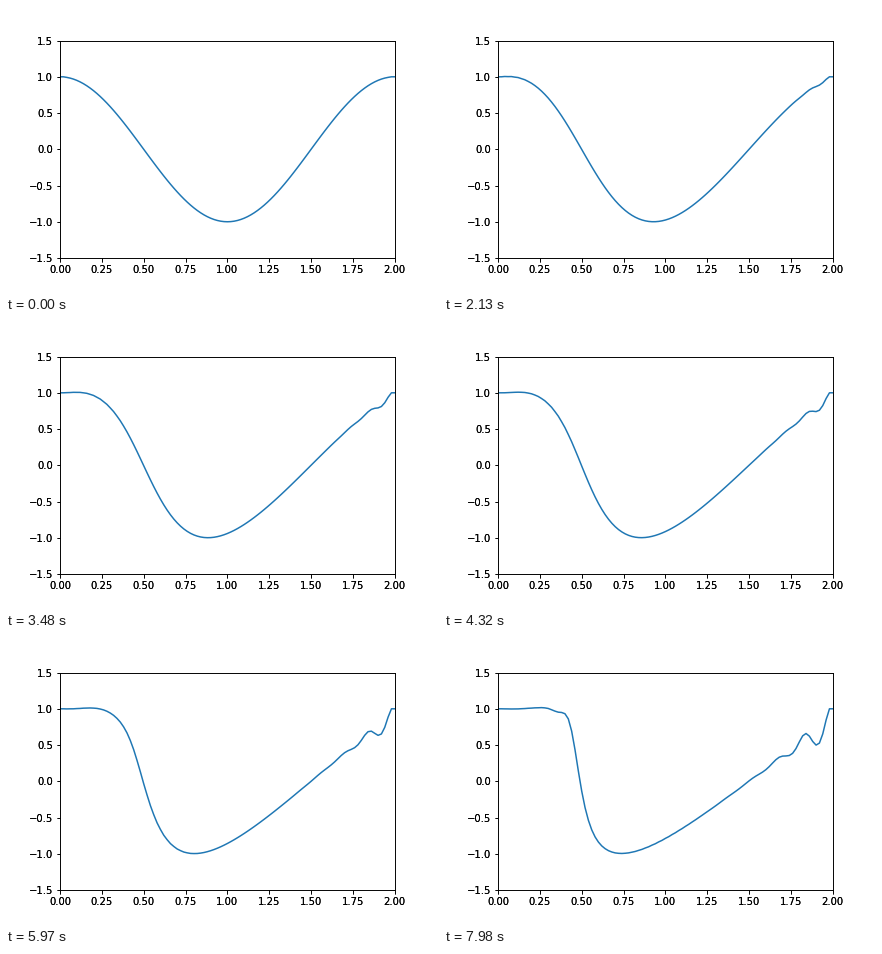
A matplotlib script for the animation above (8000 ms loop, 432 by 288 pixels).

```python
import numpy as np
import matplotlib.pyplot as plt
from matplotlib.animation import FuncAnimation

LOOP, INTERVAL, STEP = 8000, 20, 30   # ms
DELTA, DT, N = 0.022, 0.001, 101      # dispersion, time step, grid points

x = np.linspace(0, 2, N)
dx = x[1] - x[0]


def slope(u):
    """Zabusky-Kruskal form of du/dt = -u u_x - delta^2 u_xxx; the ends stay fixed."""
    du = np.zeros(N)
    advect = (u[3:-1] + u[2:-2] + u[1:-3]) * (u[3:-1] - u[1:-3]) / (6 * dx)
    disperse = (u[4:] - 2 * u[3:-1] + 2 * u[1:-3] - u[:-4]) / (2 * dx**3)
    du[2:-2] = -advect - DELTA**2 * disperse
    return du


def solve(count):
    u = np.cos(np.pi * x)
    u[:2] = u[-2:] = 1
    states = [u, u + DT * slope(u)]
    while len(states) < count:
        states.append(states[-2] + 2 * DT * slope(states[-1]))
    return states


waves = solve(LOOP // STEP + 1)

fig = plt.figure(figsize=(6, 4), dpi=72, facecolor="white")
area = [0.125, 0.125, 0.775, 0.755]


def add_axes(label):
    ax = fig.add_axes(area, label=label, facecolor="none")
    ax.set(xlim=(0, 2), ylim=(-1.5, 1.5),
           xticks=np.arange(0, 2.1, 0.25), yticks=np.arange(-1.5, 1.6, 0.5))
    return ax


# A second axes on top gives the dense, dark tick labels.
ax = add_axes("wave")
add_axes("overlay")
line, = ax.plot(x, waves[0], color="#1f77b4", lw=1.5)


def update(k):
    i = (k * INTERVAL + INTERVAL // 2) // STEP
    line.set_ydata(waves[i])
    return line,


anim = FuncAnimation(fig, update, frames=LOOP // INTERVAL, interval=INTERVAL,
                     repeat=True, repeat_delay=0, blit=False)
plt.show()
```
